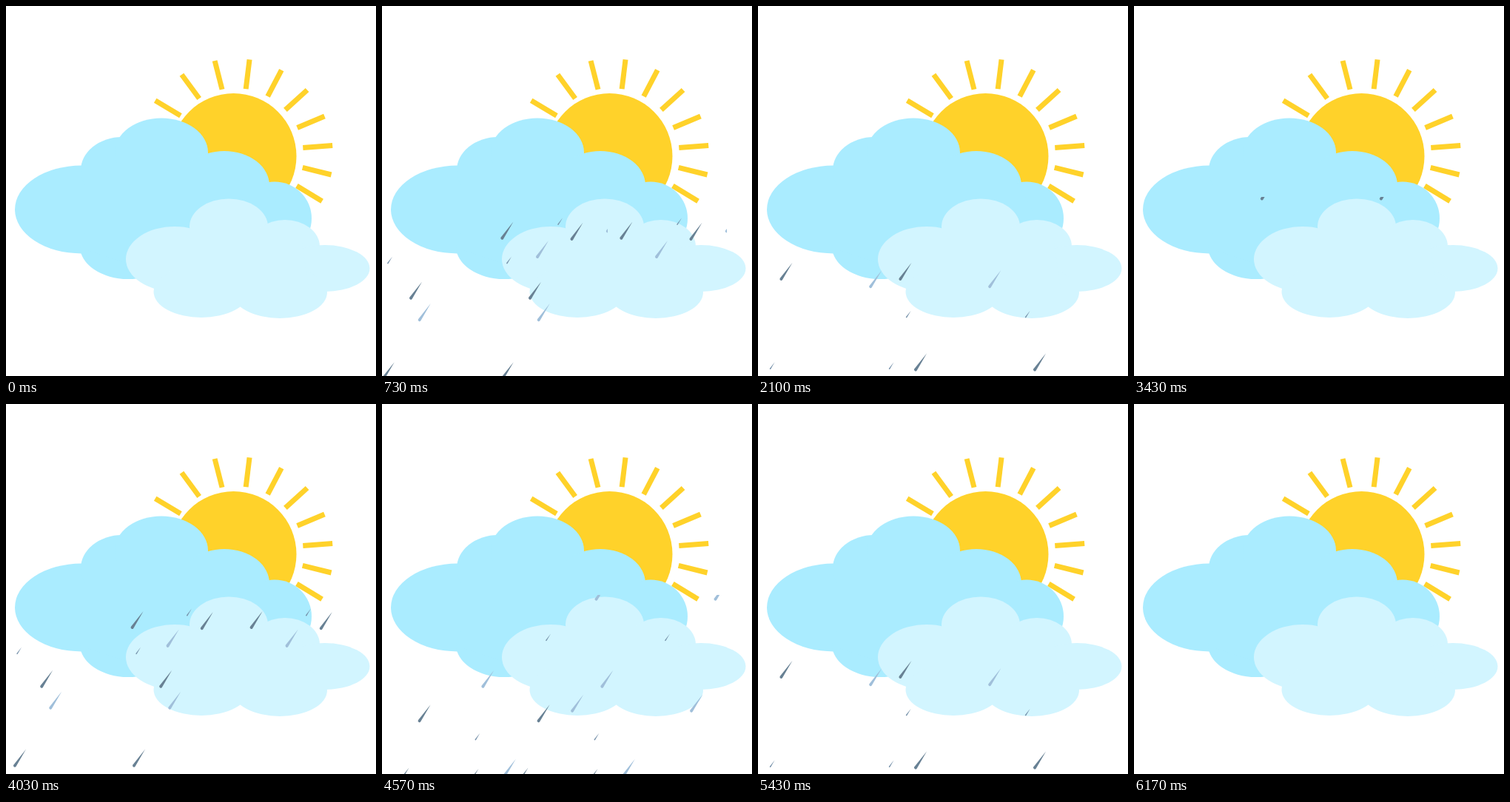
Write an HTML page that moves like this. It is 500 px wide and 500 px high and loops after 6630 ms.

```html
<!DOCTYPE html>
<html lang="en">
<head>
<meta charset="utf-8">
<title>Sun, clouds and rain</title>
<style>
  html, body { margin: 0; width: 100%; height: 100%; overflow: hidden; background: #fff; }
  svg { display: block; width: 100%; height: 100%; }
</style>
</head>
<body>
<svg viewBox="0 0 500 500">
  <defs>
    <clipPath id="area"><rect y="258" width="305" height="242"/></clipPath>
    <path id="drop" d="M17-24L3.6-.8A2 2 0 0 1 .4-3.2Z"/>
  </defs>
  <g id="sun" fill="#ffd22a"><circle cx="307.5" cy="203" r="85"/></g>
  <g fill="#aaecff">
    <ellipse cx="102" cy="275" rx="90" ry="59.5"/>
    <ellipse cx="157" cy="222" rx="56" ry="45"/>
    <ellipse cx="210" cy="198" rx="63" ry="46.5"/>
    <ellipse cx="295" cy="242.5" rx="61" ry="46.5"/>
    <ellipse cx="363" cy="287" rx="50" ry="49.5"/>
    <ellipse cx="165" cy="325" rx="65" ry="44"/>
    <path d="M110 220H340L390 310L200 360L110 330Z"/>
  </g>
  <g fill="#d2f5ff">
    <ellipse cx="228" cy="342" rx="66" ry="44"/>
    <ellipse cx="301" cy="298" rx="53" ry="37.5"/>
    <ellipse cx="377" cy="325" rx="47" ry="36"/>
    <ellipse cx="431" cy="354.5" rx="60.5" ry="31.5"/>
    <ellipse cx="370" cy="387" rx="64" ry="35"/>
    <ellipse cx="264" cy="386" rx="64.5" ry="35"/>
    <path d="M225 320H400L410 390H225Z"/>
  </g>
  <g id="rain"><g id="drops" clip-path="url(#area)"></g></g>
  <use href="#rain" x="161"/>
</svg>
<script>
const byId = id => document.getElementById(id);

function add(parent, name, attrs) {
  const el = document.createElementNS('http://www.w3.org/2000/svg', name);
  for (const key in attrs) el.setAttribute(key, attrs[key]);
  return parent.appendChild(el);
}

// Rays fan out around the sun, a little closer together clockwise
for (let i = 0; i < 10; i++) {
  const deg = 215.5 + 22 * i - 0.33 * i * i;
  const a = deg * Math.PI / 180;
  const x = 310 + 112 * Math.cos(a), y = 203 + 112 * Math.sin(a);
  add(byId('sun'), 'rect', {
    x: -20, y: -3.5, width: 40, height: 7,
    transform: `translate(${x} ${y}) rotate(${deg + i - 4.5})`
  });
}

const LOOP = 6630, ROUND = 100, FIRST = 3, LAST = 84;
const TOP = 258, SLANT = 0.705;
const dark = { fill: '#688194', size: 1, rate: 1 };
const light = { fill: '#a0bfda', size: 1, rate: 1 };
const small = { fill: '#7691aa', size: 0.4, rate: 0.83 };
const drops = [];

function addDrop(kind, x, birth) {
  const el = add(byId('drops'), 'use', { href: '#drop', fill: kind.fill });
  drops.push({ el, kind, x, birth });
}

// Main drops: x at the top edge and step of birth
const plant = (kind, ...list) => list.forEach(([x, birth]) => addDrop(kind, x, birth));
plant(dark, [174, 2.6], [296, 16.8], [201, 16.9], [170, 22.9], [173, 38], [377, 44.4], [109, 53.4]);
plant(light, [337, 17.7], [367, 23.9], [223, 26.4], [293, 36.3], [237, 52.6]);
plant(small, [264, 17.9], [265, 30.4], [180, 40.8], [33, 41.1], [315, 46.8]);

// Scattered drops as the rain sets in and dies down
let seed = 11;
const random = () => (seed = seed * 16807 % 2147483647) / 2147483647;
function scatter(from, to, maxX) {
  const kinds = [small, light, dark];
  for (let birth = from, i = 0; birth < to; birth += 2.2, i++)
    addDrop(kinds[i % 3], 60 + random() * (maxX - 60), birth);
}
scatter(6, 15, 300);
scatter(64, 82, 225);

const fall = n => 10.8 * n + 0.1 * n * n;
let shown = -1;

function draw(ms) {
  let step = Math.floor((ms % LOOP + 5) * 0.03);
  // The first shower skips every third step
  if (step < ROUND && step % 3 === 2) step--;
  step %= ROUND;
  if (step === shown) return;
  shown = step;
  const wet = step >= FIRST && step <= LAST;
  for (const { el, kind, x, birth } of drops) {
    const n = (step - birth) * kind.rate;
    el.setAttribute('visibility', wet && n > 0 ? 'visible' : 'hidden');
    const d = fall(n);
    el.setAttribute('transform', `translate(${x - SLANT * d} ${TOP + d}) scale(${kind.size})`);
  }
}

const start = performance.now();
function tick() {
  draw(performance.now() - start);
  requestAnimationFrame(tick);
}
tick();
</script>
</body>
</html>
```
